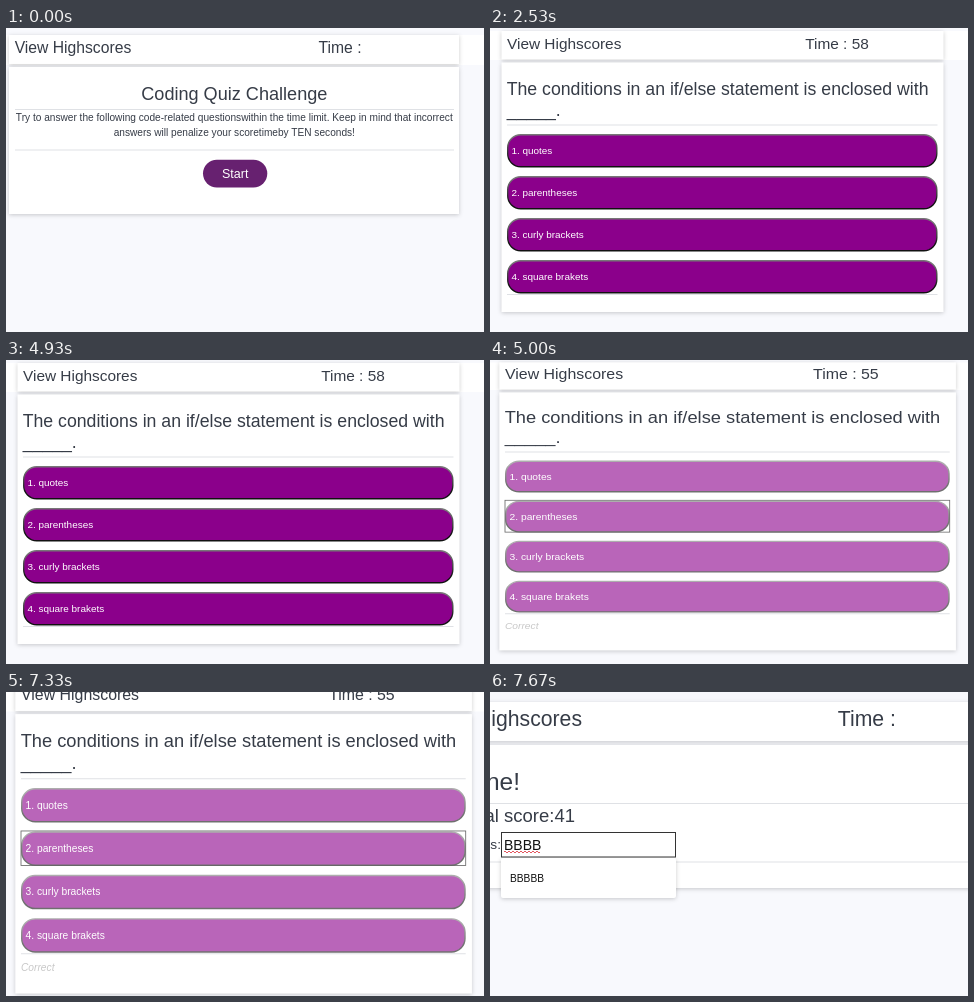
These frames come from a looping animation (478x304 px, 8 s). An HTML page:

```html
<!DOCTYPE html>
<html lang="en">
<head>
<meta charset="utf-8">
<title>Coding quiz</title>
<style>
  html, body { margin: 0; width: 100%; height: 100%; overflow: hidden; background: #f8f9fd; }
  svg { display: block; font-family: "Liberation Sans", Arial, sans-serif; fill: #363c47; }
  .card { fill: #fff; filter: drop-shadow(0 1px 2px #0003); }
  .strip { fill: #fff; }
  .rule { stroke: #dfe1e5; }
  .mid { text-anchor: middle; }
  .end { text-anchor: end; }
  .option rect { fill: #8b008b; stroke: url(#bevel); stroke-width: 1.4; }
  .option text { fill: #fff; font-size: 9.95px; }
  .answered .option { opacity: .6; }
  .reply { display: none; }
  .answered .reply { display: inline; }
</style>
</head>
<body>
<svg width="478" height="304" viewBox="0 0 478 304">
  <defs>
    <linearGradient id="bevel" x2="0" y2="1">
      <stop offset=".1" stop-color="#777"/>
      <stop offset=".8" stop-color="#111"/>
    </linearGradient>
  </defs>

  <g id="intro">
    <rect class="strip" y="7" width="478" height="30"/>
    <rect class="card" x="3" y="7" width="450" height="29"/>
    <rect class="card" x="3" y="39" width="450" height="147"/>
    <g font-size="15.7">
      <text x="8.7" y="25">View Highscores</text>
      <text x="312.5" y="25">Time :</text>
    </g>
    <text class="mid" x="228.3" y="72" font-size="18.1">Coding Quiz Challenge</text>
    <path class="rule" d="M9 81.5H448M9 122H448"/>
    <g class="mid" font-size="10.13">
      <text x="228.3" y="93">Try to answer the following code-related questionswithin the time limit. Keep in mind that incorrect</text>
      <text x="228.3" y="108">answers will penalize your scoretimeby TEN seconds!</text>
    </g>
    <rect x="197" y="131.7" width="64.3" height="27.8" rx="13.9" fill="#672170"/>
    <text class="mid" x="229.2" y="150" font-size="12.5" style="fill:#fff">Start</text>
  </g>

  <g id="quiz">
    <rect class="strip" x="-20" y="3" width="540" height="29"/>
    <rect class="card" x="11.5" y="3" width="442" height="28.5"/>
    <rect class="card" id="panel" x="11.5" y="34.5" width="442" height="249.5"/>
    <g font-size="15.4">
      <text x="17" y="20.7">View Highscores</text>
      <text x="315.2" y="20.7">Time : <tspan id="clock"></tspan></text>
    </g>
    <g font-size="17.7">
      <text x="16.7" y="66.5">The conditions in an if/else statement is enclosed with</text>
      <text x="16.7" y="87.5">_____.</text>
    </g>
    <path class="rule" d="M17 97H447.5M17 266.5H447.5"/>
    <g id="options"></g>
    <g class="reply">
      <rect x="17" y="147.6" width="430.5" height="33.4" fill="none" stroke="#666" stroke-width=".8"/>
      <text x="17" y="282.8" font-size="9.9" font-style="italic" fill="#c8c8c8">Correct</text>
    </g>
  </g>

  <g id="done">
    <rect class="card" x="-80" y="10" width="640" height="39"/>
    <rect class="card" x="-80" y="53" width="640" height="143"/>
    <g font-size="21.2">
      <text class="end" x="92" y="34.3">View Highscores</text>
      <text x="347.8" y="34.3">Time :</text>
    </g>
    <text class="end" x="30" y="98.3" font-size="24.5">All done!</text>
    <path class="rule" d="M0 111.5H478M0 170H478"/>
    <text class="end" x="85" y="129.5" font-size="18.5">Your final score:41</text>
    <text class="end" x="11" y="157" font-size="13.7">Enter initials:</text>
    <rect class="card" x="11" y="166" width="175" height="40" rx="2"/>
    <rect x="11.5" y="140.5" width="174" height="24.5" fill="#fff" stroke="#333"/>
    <g fill="#111">
      <text x="14" y="158" font-size="14">BBBB</text>
      <text x="20" y="190" font-size="10.2">BBBBB</text>
    </g>
    <path d="M14 160q1-2 2 0t2 0 2 0 2 0 2 0 2 0 2 0 2 0 2 0 2 0 2 0 2 0 2 0 2 0 2 0 2 0 2 0 2 0" fill="none" stroke="#e0444e" stroke-width=".9"/>
  </g>
</svg>
<script>
const LOOP = 8000, QUIZ = 2530, ANSWER = 5000, SETTLED = 5470, DONE = 7530;
const $ = id => document.getElementById(id);

$('options').innerHTML = ['quotes', 'parentheses', 'curly brackets', 'square brakets']
  .map((label, i) => `<g class="option" transform="translate(17 ${106 + 42 * i})">
    <rect x=".7" y=".7" width="429.1" height="32" rx="13"/>
    <text x="4.4" y="20">${i + 1}. ${label}</text></g>`).join('');

function draw(now) {
  const t = now % LOOP;
  const scene = t < QUIZ ? 'intro' : t < DONE ? 'quiz' : 'done';
  for (const id of ['intro', 'quiz', 'done']) $(id).style.display = id === scene ? '' : 'none';

  const answered = t >= ANSWER;
  $('quiz').classList.toggle('answered', answered);
  $('clock').textContent = answered ? 55 : 58;
  $('panel').setAttribute('height', answered ? 270.5 : 249.5);

  // The answered view is zoomed in and stretches vertically until it settles.
  const p = Math.min(1, Math.max(0, (t - ANSWER) / (SETTLED - ANSWER)));
  const stretch = 0.923 + 0.077 * p;
  $('quiz').setAttribute('transform', answered
    ? `translate(0 156) scale(1 ${stretch}) translate(-2.56 -169.5) scale(1.033)`
    : '');
  requestAnimationFrame(draw);
}
requestAnimationFrame(draw);
</script>
</body>
</html>
```
